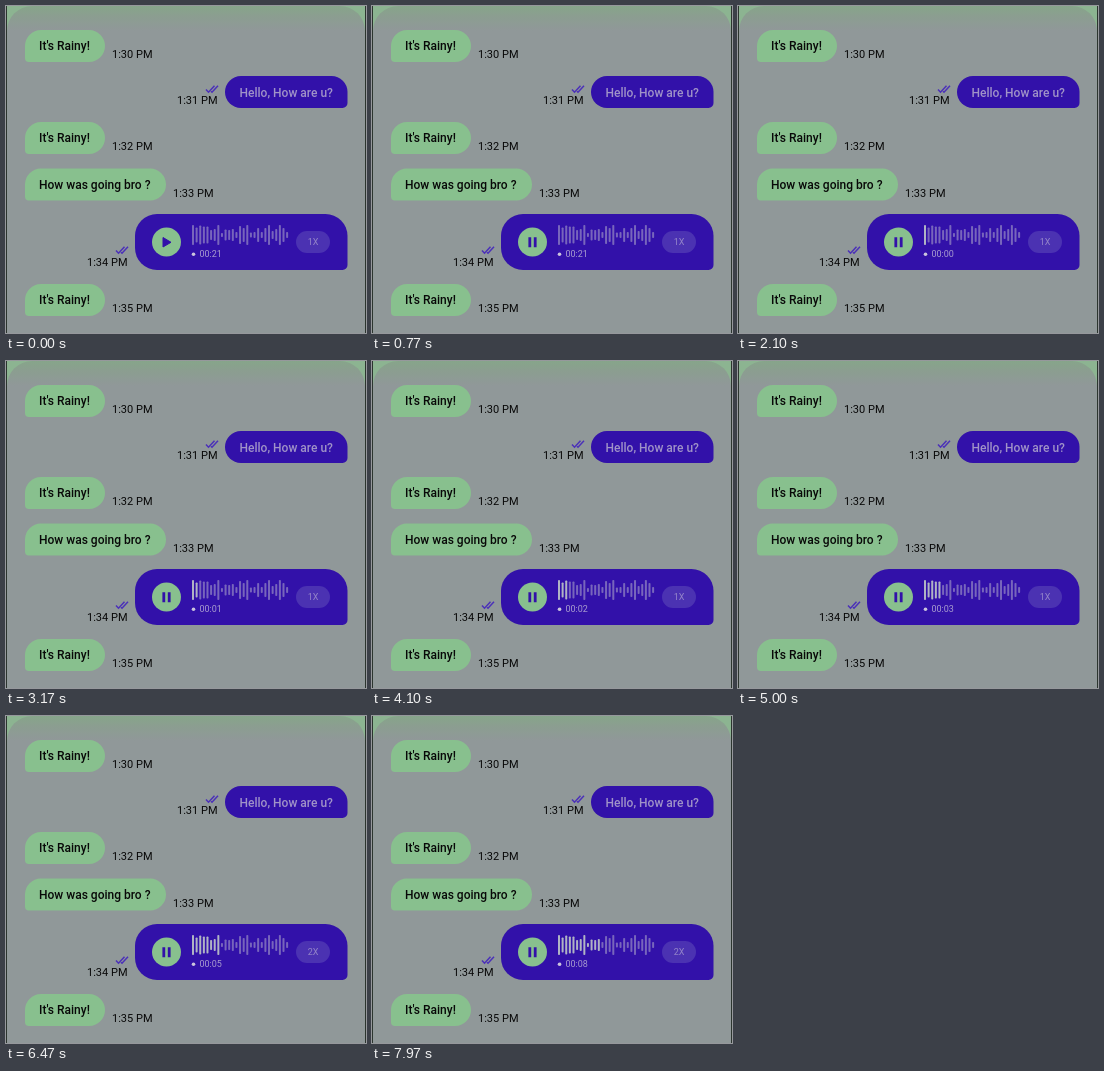
Recreate the animation shown at these times as an HTML page. Size 360 px wide and 327 px high, loop 8 s.

```html
<!DOCTYPE html>
<html lang="en">
<head>
<meta charset="utf-8">
<title>Voice message chat</title>
<style>
  html, body { margin: 0; width: 100%; height: 100%; overflow: hidden; background: #909899; }
  svg { display: block; width: 100vw; height: 100vh; }
  text { font-family: Roboto, sans-serif; }
  .message { font-size: 12px; font-weight: 500; }
  .time { font-size: 11px; }
  .small { font-size: 9px; fill: #a092cf; }
</style>
</head>
<body>
<svg id="stage" viewBox="0 0 360 327">
  <defs>
    <linearGradient id="panel" x1="0" y1="0" x2="0" y2="1">
      <stop offset="0" stop-color="#86a58a"/>
      <stop offset=".03" stop-color="#8b9e90"/>
      <stop offset=".075" stop-color="#909899"/>
      <stop offset="1" stop-color="#909899"/>
    </linearGradient>
  </defs>
  <rect width="360" height="327" fill="#8cb491"/>
  <path d="M1 327V25A25 25 0 0 1 26 0H334A25 25 0 0 1 359 25V327Z" fill="url(#panel)"/>
  <path d="M.5 0V327M359.5 0V327" stroke="#2c352f"/>
</svg>
<script>
const LOOP = 8000, PRESS = 600, START = 1800, FAST = 5500, DURATION = 21;
const GREEN = '#88c08e', PURPLE = '#3211a9';
const stage = document.getElementById('stage');

function add(tag, attrs, content = '') {
  const node = document.createElementNS('http://www.w3.org/2000/svg', tag);
  for (const key in attrs) node.setAttribute(key, attrs[key]);
  node.textContent = content;
  return stage.appendChild(node);
}

const label = (x, y, content, cls, fill = '#080808', anchor = 'start') =>
  add('text', { x, y, class: cls, style: `fill:${fill}`, 'text-anchor': anchor }, content);

// Rounded bubble with one tight bottom corner on the sender's side.
function bubble(x, y, w, h, r, mine) {
  const right = mine ? 5 : r, left = mine ? r : 4;
  const arc = (radius, dx, dy) => `a${radius} ${radius} 0 0 1 ${dx * radius} ${dy * radius}`;
  add('path', {
    d: `M${x + r} ${y}H${x + w - r}${arc(r, 1, 1)}V${y + h - right}${arc(right, -1, 1)}` +
       `H${x + left}${arc(left, -1, -1)}V${y + r}${arc(r, 1, -1)}Z`,
    fill: mine ? PURPLE : GREEN
  });
}

function checks(x, y) {
  add('path', {
    d: `M${x} ${y + 4.5}l2.5 2.7 6-6.5M${x + 5} ${y + 6.2}l1 1 6-6.5`,
    fill: 'none', stroke: '#4b30b9', 'stroke-width': 1.5
  });
}

function incoming(y, width, content, time) {
  bubble(19, y, width, 32, 16, false);
  label(33, y + 20, content, 'message');
  label(width + 26, y + 28, time, 'time');
}

incoming(24, 80, "It's Rainy!", '1:30 PM');
bubble(219, 70, 122.5, 32, 16, true);
label(233.5, 90.5, 'Hello, How are u?', 'message', '#a093c8');
label(171, 98, '1:31 PM', 'time');
checks(200, 79);
incoming(116, 80, "It's Rainy!", '1:32 PM');
incoming(162.5, 141, 'How was going bro ?', '1:33 PM');
bubble(129, 208, 212.5, 56, 22, true);
label(81, 260, '1:34 PM', 'time');
checks(110, 240);
incoming(278, 80, "It's Rainy!", '1:35 PM');

add('circle', { cx: 160.5, cy: 236, r: 14.5, fill: GREEN });
const play = add('path', { d: 'M157 231.5L165 236.3 157 241Z', fill: PURPLE, stroke: PURPLE, 'stroke-linejoin': 'round' });
const pause = add('path', { d: 'M157.8 231.3V241.3M163.2 231.3V241.3', stroke: PURPLE, 'stroke-width': 2.8 });

const heights = [20, 15, 19, 17, 17, 10, 12, 20, 4, 11, 10, 12, 6, 18,
  14, 20, 5, 6, 14, 6, 14, 20, 8, 12, 20, 14, 6];
const bars = heights.map((h, i) => add('rect', {
  x: 186 + i * 3.62, y: 229 - h / 2, width: 2, height: h, rx: 0.8
}));

add('circle', { cx: 187.5, cy: 248.3, r: 1.8, fill: '#cbc4dd' });
const counter = label(193.5, 251.3, '', 'small', '#a99dcf');
add('rect', { x: 290, y: 225, width: 34, height: 22, rx: 11, fill: '#4b32b2' });
const speed = label(307, 239.3, '', 'small', '#9586c9', 'middle');

function render(t) {
  const started = t >= START;
  const position = Math.max(0, t - START + Math.max(0, t - FAST)) / 1000;
  const seconds = started ? Math.floor(position) : DURATION;
  play.style.display = t < PRESS ? '' : 'none';
  pause.style.display = t < PRESS ? 'none' : '';
  counter.textContent = '00:' + String(seconds).padStart(2, '0');
  speed.textContent = t < FAST ? '1X' : '2X';
  bars.forEach((bar, i) => {
    const played = started && i / bars.length <= position / DURATION;
    bar.setAttribute('fill', played ? '#b0b4c4' : '#7866bc');
  });
}

const origin = performance.now();
function frame() {
  render((performance.now() - origin) % LOOP);
  requestAnimationFrame(frame);
}
frame();
</script>
</body>
</html>
```
